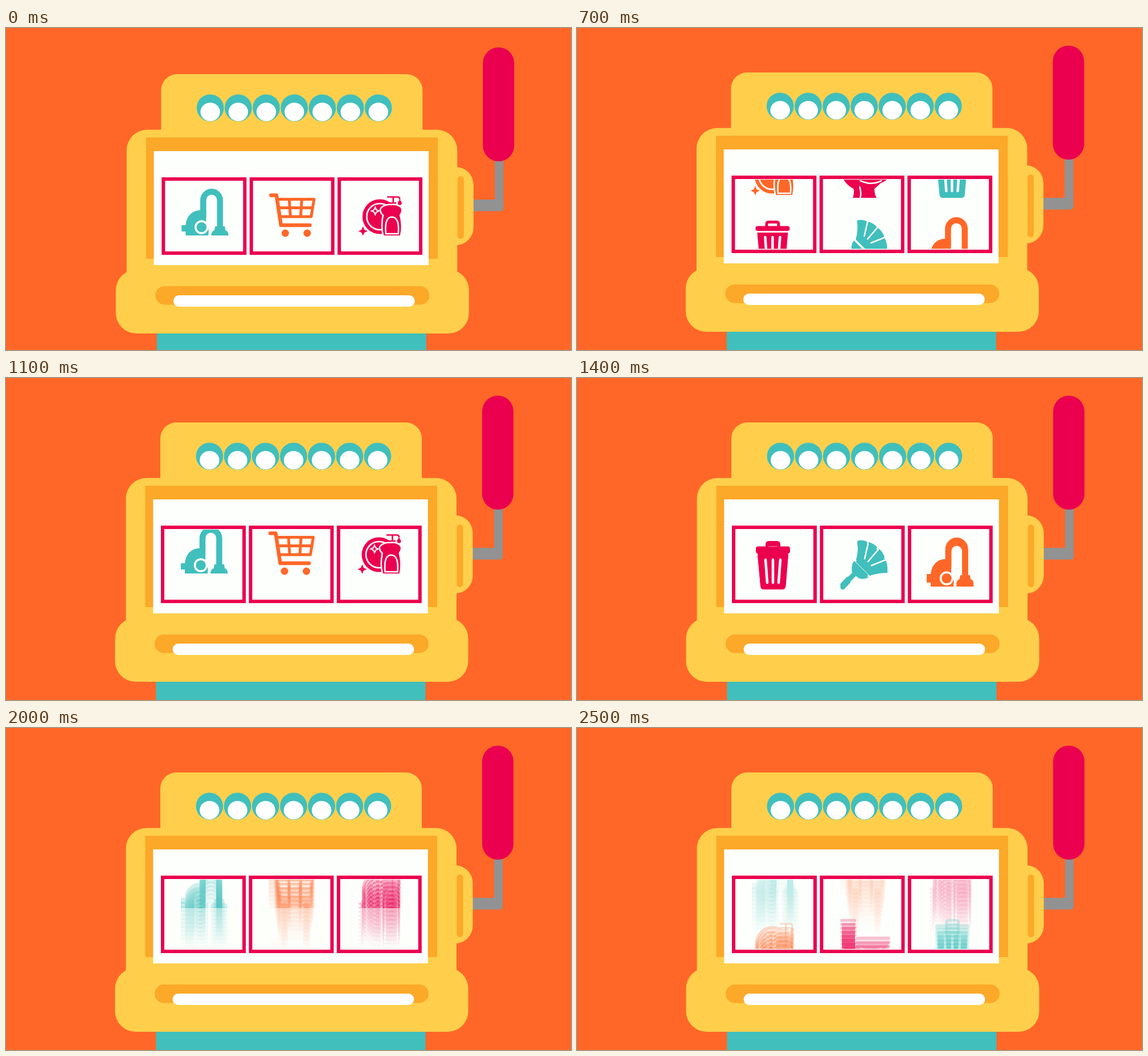
Write an HTML page that moves like this. It is 992 by 565 pixels and loops after 2600 ms.

```html
<!DOCTYPE html>
<html lang="en">
<head>
<meta charset="utf-8">
<title>Slot machine</title>
<style>
  html, body { margin: 0; width: 100%; height: 100%; overflow: hidden; background: #ff6728; }
  svg { display: block; width: 100vw; height: 100vh; }
  .teal { color: #40bfbc; }
  .red { color: #eb0050; }
  .orange { color: #ff6728; }
  .icon { fill: currentColor; }
  .line { fill: none; stroke: currentColor; stroke-linecap: round; stroke-linejoin: round; }
  .cut { fill: none; stroke: #fdfffc; stroke-width: 2.6; stroke-linecap: round; }
</style>
</head>
<body>
<svg viewBox="0 0 992 565" preserveAspectRatio="none">
  <defs>
    <g id="vacuum" class="icon">
      <path class="line" style="stroke-linecap:butt" stroke-width="10.5" d="M345 330V299a14.7 14.7 0 0 1 29.4 0V348"/>
      <path d="M366 345H383L384 352Q389 353 389.500 361H359Q359 354 364.500 352Z"/>
      <path d="M314 361V354H307V343H314Q317 317 342 316.500H350V338Q356 348 354 361Z"/>
      <circle cx="342" cy="346.500" r="10.500" class="cut" style="stroke-width:3.5"/>
    </g>
    <g id="cart" class="line">
      <path stroke-width="6.500" d="M464 290.500H473.500L481.500 343H532"/>
      <path stroke-width="5" d="M476 297.500H539.500L534.500 328H480M478 312.500H536M496 298L498 327M518 298L516 327"/>
      <g class="icon" stroke="none"><circle cx="489" cy="357" r="6.500"/><circle cx="527.500" cy="357" r="6.500"/></g>
    </g>
    <g id="dishes" class="icon">
      <circle cx="655" cy="328" r="30.500"/>
      <circle cx="655" cy="328" r="23" class="cut"/>
      <path class="cut" style="stroke-width:2" d="M647 311.500L649 316 653.500 318 649 320 647 324.500 645 320 640.500 318 645 316Z"/>
      <path d="M625.500 345L628 351 633.500 353.500 628 356 625.500 361.500 623 356 617.500 353.500 623 351Z"/>
      <path stroke="#fdfffc" stroke-width="5" paint-order="stroke" d="M671 308H683Q693 311 693 317Q692 322 689.500 325Q694.500 344 690.500 361H662Q658 344 662 325Q657 321 657 315.500Q660 309 671 308Z"/>
      <path class="cut" d="M665.500 358Q663 329 676 328.500Q690 329 687.500 358Z"/>
      <path class="line" stroke-width="2.600" d="M669 293.500H687Q690 294 690 297M678.500 294V302M674 304H683"/>
      <path d="M690 298Q694 303 693.500 305a3.600 3.600 0 0 1-7 0Q686.500 302 690 298Z"/>
    </g>
    <g id="bin" class="icon">
      <path class="line" stroke-width="5" d="M333.500 296V291Q333.500 287.500 337 287.500H351Q354.500 287.500 354.500 291V296"/>
      <rect x="314" y="294.500" width="60" height="8.500" rx="4"/>
      <path d="M317 306H371L366.500 360Q366 366 360 366H328Q322.500 366 322 360Z"/>
      <path class="cut" style="stroke-width:4.5" d="M331 314L334 354M344 314V354M357 314L354 354"/>
    </g>
    <g id="toilet" class="icon">
      <rect x="462" y="285" width="28" height="5" rx="2"/>
      <path d="M465 292H488V298H491V301H488V325H549Q547 336 534 340L523 350Q522 358 526.500 366H485Q488 355 486 350Q470 342 465 325Z"/>
      <rect x="490" y="316" width="60" height="6" rx="3"/>
      <path class="cut" d="M498 336Q518 345 535 336M497 347Q500 356 498 366"/>
    </g>
    <g id="duster" class="icon">
      <path class="line" stroke-width="8.500" d="M466.500 362L476 352"/>
      <path class="line" stroke-width="6" d="M474 354L488 340"/>
      <path d="M487 320L512 345Q503 349 495 346.500L483 337Q481 326 487 320Z"/>
      <path d="M492 285Q500 282 509 286Q522 289 528 297Q538 304 540.500 315Q546 326 545 337Q528 337 514 342L490 318Q495 301 492 285Z"/>
      <path class="cut" d="M505 312L511 286M511 317L529 296M517 324L542 314"/>
    </g>
    <g id="row0">
      <use href="#vacuum" class="teal"/><use href="#cart" class="orange"/><use href="#dishes" class="red"/>
    </g>
    <g id="row1">
      <use href="#dishes" x="-312" class="orange"/><use href="#toilet" class="red"/><use href="#bin" x="315" class="teal"/>
    </g>
    <g id="row2">
      <use href="#bin" class="red"/><use href="#duster" class="teal"/><use href="#vacuum" x="307" class="orange"/>
    </g>
    <clipPath id="view"><rect x="275" y="266" width="452" height="121.500"/></clipPath>
  </defs>

  <rect width="992" height="565" fill="#ff6728"/>
  <g id="machine">
    <rect x="263.500" y="520" width="473" height="60" fill="#40bfbc"/>
    <path d="M864.500 225V308H815" fill="none" stroke="#929292" stroke-width="15"/>
    <path d="M815 298H872V313Q872 318.500 866 318.500H815Z" fill="#929292"/>
    <rect x="836" y="31" width="55" height="200" rx="27.500" fill="#eb0050"/>
    <g fill="#ffcf4b">
      <rect x="740" y="241" width="79.500" height="137" rx="31"/>
      <rect x="271" y="78" width="459" height="140" rx="28"/>
      <rect x="210.500" y="175.500" width="580.500" height="300" rx="36"/>
      <rect x="191.500" y="421" width="620" height="112" rx="36"/>
    </g>
    <g fill="#fca829">
      <rect x="791.500" y="257" width="11" height="110" rx="5.500"/>
      <rect x="244.500" y="189" width="512.500" height="213"/>
      <rect x="261" y="450" width="481" height="32.500" rx="16"/>
    </g>
    <rect x="292.500" y="466" width="424" height="20" rx="10" fill="#fff"/>
    <rect x="258.300" y="213" width="482.500" height="200" fill="#fdfffc"/>
    <g id="lights"></g>
    <g id="reels" clip-path="url(#view)"></g>
    <rect id="veil" x="275" y="316" width="452" height="73" fill="#fdfffc" opacity="0"/>
    <g id="windows" fill="none" stroke="#eb0050" stroke-width="6"></g>
  </g>
</svg>
<script>
  const NS = 'http://www.w3.org/2000/svg';
  const LOOP = 2600, STEP = 100, PITCH = 121, ECHOES = 11;
  const $ = id => document.getElementById(id);

  function add(parent, tag, attrs) {
    const el = document.createElementNS(NS, tag);
    for (const key in attrs) el.setAttribute(key, attrs[key]);
    return parent.appendChild(el);
  }

  for (let i = 0; i < 7; i++) {
    const cx = 357.3 + i * 49.2;
    add($('lights'), 'circle', { cx, cy: 137.2, r: 23.8, fill: '#40bfbc' });
    add($('lights'), 'ellipse', { cx, cy: 144.2, rx: 17.2, ry: 16.2, fill: '#fff' });
  }
  for (let i = 0; i < 3; i++) {
    add($('windows'), 'rect', { x: 275 + i * 154.4, y: 262, width: 143, height: 130 });
  }

  const rows = [0, 1, 2].map(i => {
    const group = add($('reels'), 'g', {});
    const echoes = [];
    for (let k = 0; k < ECHOES; k++) echoes.push(add(group, 'use', { href: '#row' + i }));
    return { group, echoes };
  });

  // Keys are [time, value] pairs, joined by straight lines.
  const shakeX = [[0, 1.3], [300, .6], [700, -.6], [1100, 0]];
  const shakeY = [[0, 3], [300, 0]];
  const travel = [[0, 0], [300, 56], [700, 189], [1100, 381], [1400, 604], [2000, 1134], [2500, 1523]];

  function at(keys, t) {
    for (let i = 1; i < keys.length; i++) {
      const [t0, v0] = keys[i - 1], [t1, v1] = keys[i];
      if (t <= t1) return v0 + (v1 - v0) * (t - t0) / (t1 - t0);
    }
    return keys[keys.length - 1][1];
  }

  function rowOpacity(offset, blurred) {
    if (!blurred) return 1;
    if (offset < -60) return .4;
    return offset > 60 ? .05 : 1;
  }

  function draw(t) {
    const blurred = t >= 1500;
    const count = blurred ? ECHOES : t >= 1400 ? 2 : 1;
    const gap = blurred ? Math.min(7, 2 + (t - 1500) / 100) : 4;
    const pos = at(travel, t), span = 3 * PITCH;

    $('machine').setAttribute('transform', `translate(${at(shakeX, t)} ${at(shakeY, t)})`);
    $('veil').setAttribute('opacity', t >= 1900 && t <= 2100 ? .5 : 0);

    rows.forEach(({ group, echoes }, i) => {
      const raw = (i + 1) * PITCH - pos;
      const offset = ((raw % span) + span) % span - PITCH;
      group.setAttribute('opacity', rowOpacity(offset, blurred));
      echoes.forEach((echo, k) => {
        const alpha = blurred ? .24 * (1 - k / 13) : 1;
        echo.setAttribute('y', offset + k * gap);
        echo.setAttribute('opacity', k < count ? alpha : 0);
      });
    });
  }

  const start = performance.now();
  function tick() {
    const t = (performance.now() - start) % LOOP;
    draw(Math.floor(t / STEP) * STEP);
    requestAnimationFrame(tick);
  }
  tick();
</script>
</body>
</html>
```
